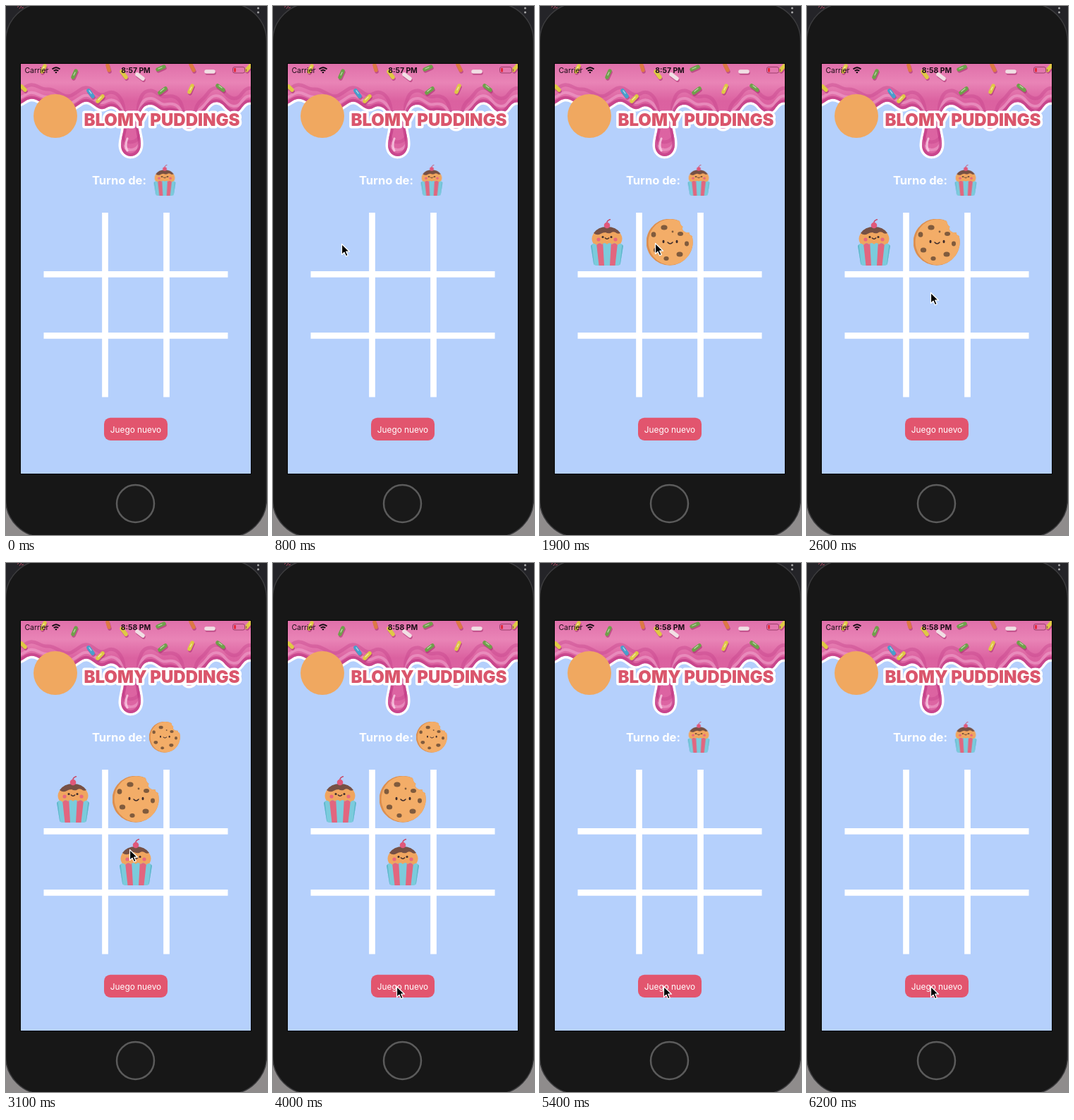
Animation, 370 px wide and 750 px high, one loop 6300 ms. Source, as an HTML page:

```html
<!DOCTYPE html>
<html lang="es">
<head>
<meta charset="utf-8">
<title>Tres en raya</title>
<style>
html, body { margin: 0; width: 100%; height: 100%; overflow: hidden; background: #242428; }
svg { display: block; }
text { font-family: Inter, Roboto, sans-serif; }

/* 6300 ms loop: 1% = 63 ms */
.early, .late, .first, .second, .third, .cup, .cookie { animation: 6300ms step-end infinite; }
.early  { animation-name: early; }
.late   { animation-name: late; }
.first  { animation-name: first; }
.second { animation-name: second; }
.third  { animation-name: third; }
.cup    { animation-name: cup; }
.cookie { animation-name: cookie; }
.button { animation: press 6300ms linear infinite; }
.cursor { animation: move 6300ms ease-in-out infinite, enter 6300ms step-end infinite; }

@keyframes early  { 0% { opacity: 1 } 31.746% { opacity: 0 } }
@keyframes late   { 0% { opacity: 0 } 31.746% { opacity: 1 } }
@keyframes first  { 0% { opacity: 0 } 14.286% { opacity: 1 } 73.016% { opacity: 0 } }
@keyframes second { 0% { opacity: 0 } 30.159% { opacity: 1 } 73.016% { opacity: 0 } }
@keyframes third  { 0% { opacity: 0 } 46.032% { opacity: 1 } 73.016% { opacity: 0 } }
@keyframes cup {
  0%, 30.159%, 73.016% { opacity: 1 }
  14.286%, 46.032% { opacity: 0 }
}
@keyframes cookie {
  0%, 30.159%, 73.016% { opacity: 0 }
  14.286%, 46.032% { opacity: 1 }
}
@keyframes press {
  0%, 69.841% { opacity: 1 }
  71.429%, 73.016% { opacity: .2 }
  77.778%, 100% { opacity: 1 }
}
@keyframes enter { 0% { opacity: 0 } 4.762% { opacity: 1 } }
@keyframes move {
  0%, 4.762% { transform: translate(372px, 430px) }
  11.111%, 17.46% { transform: translate(97px, 337px) }
  22.222%, 34.921% { transform: translate(163px, 336px) }
  39.683%, 52.381% { transform: translate(175px, 406px) }
  60.317%, 100% { transform: translate(175px, 600px) }
}
</style>
</head>
<body>
<svg width="370" height="750" viewBox="0 0 370 750">
  <defs>
    <clipPath id="screen"><path d="M21 82h326v581H21z"/></clipPath>
    <clipPath id="wrap"><path d="M10 38q4-6 8-1q4-5 8-1q3.500-4 7 0q3.500-4 7 0q4-4 8 1q4-5 8 1L52 63q-.5 3-4 3H18q-3.500 0-4-3z"/></clipPath>
    <linearGradient id="outside" x2="0" y2="1">
      <stop offset=".5" stop-color="#242428"/><stop offset=".9" stop-color="#8f8c8c"/>
    </linearGradient>
    <linearGradient id="pink" gradientUnits="userSpaceOnUse" x1="0" y1="82" x2="0" y2="214">
      <stop offset="0" stop-color="#e070aa"/><stop offset=".2" stop-color="#e984b6"/>
      <stop offset=".4" stop-color="#db61a0"/><stop offset="1" stop-color="#dd65a3"/>
    </linearGradient>

    <path id="icing" d="M14 76H354V139C343 133 338 139 333 146C327 154 318 152 311 144C303 133 292 134 285 145C278 155 274 153 270 163C268 177 252 178 250 164C247 151 239 147 230 148C218 151 215 141 206 140C194 139 191 149 188 160C185 174 192 185 191 197C190 218 164 218 163 198C163 184 170 174 166 160C162 145 152 139 143 144C133 150 128 142 119 137C109 132 102 143 92 147C80 151 72 138 60 138C48 139 44 130 34 132C27 133 24 140 14 140z"/>
    <clipPath id="glaze"><use href="#icing"/></clipPath>

    <symbol id="cupcake" viewBox="0 0 66 66">
      <path d="M33 7q-1-5 5-6.500" fill="none" stroke="#c94a68" stroke-width="1.500"/>
      <ellipse cx="33" cy="28" rx="21.500" ry="16" fill="#f0a55f"/>
      <path d="M14 20Q20 11 33 11t19 9q-4 2-7-1q-4-2-7 1q-4 1-7-1q-4 0-7 2q-5 3-10-1z" fill="#775044"/>
      <circle cx="33" cy="9" r="4.300" fill="#e0587a"/>
      <g fill="#e9677e"><circle cx="21" cy="29" r="2.600"/><circle cx="45" cy="29" r="2.600"/></g>
      <g fill="#3d2b2b"><circle cx="27" cy="25.500" r="1.500"/><circle cx="39" cy="25.500" r="1.500"/></g>
      <path d="M30 26.500q3 3.500 6 0" fill="none" stroke="#3d2b2b" stroke-width="1.300"/>
      <g clip-path="url(#wrap)">
        <path d="M8 30h50v36H8z" fill="#7bcbdc"/>
        <path d="M17.500 30h9.500l2 36h-7.500zM39 30h9.500l-4 36H37z" fill="#e2667f"/>
        <path d="M8 30h3l4 36h-5zM55 30h4l-5 36h-3z" fill="#5fb7cc"/>
      </g>
    </symbol>

    <symbol id="biscuit" viewBox="0 0 66 66">
      <path d="M47 3A33 33 0 1 0 64.500 24q-4-1-4-5q-5 1-8-2t-1-6q-4-3-4.500-8z" fill="#dc8f50"/>
      <path d="M47 3A31.500 32.500 0 1 0 64.500 24q-4-1-4-5q-5 1-8-2t-1-6q-4-3-4.500-8z" fill="#f3ad68"/>
      <g fill="#805b3d">
        <ellipse cx="25" cy="12" rx="4.600" ry="3.500"/><ellipse cx="48" cy="21" rx="4" ry="3"/>
        <ellipse cx="10" cy="22" rx="3.400" ry="3.800"/><ellipse cx="57" cy="35" rx="3" ry="3.400"/>
        <ellipse cx="14" cy="44" rx="4.200" ry="3.600"/><ellipse cx="47" cy="50" rx="4.500" ry="3.600"/>
        <ellipse cx="28" cy="56" rx="3.600" ry="3"/><circle cx="37" cy="18" r="1.400"/>
      </g>
      <g fill="#3d2b2b"><ellipse cx="24" cy="32" rx="1.500" ry="2.200"/><ellipse cx="43" cy="32" rx="1.500" ry="2.200"/></g>
      <path d="M30 33q3.500 4 7 0" fill="none" stroke="#3d2b2b" stroke-width="1.500" stroke-linecap="round"/>
    </symbol>
  </defs>

  <!-- Phone -->
  <path d="M0 0h370v750H0z" fill="url(#outside)"/>
  <path d="M16 2l2-2m1 4l3-4m0 3l3-1" stroke="#b04860"/>
  <rect x="-.5" y="-4" width="370" height="757" rx="54" fill="#171717" stroke="#3c3c3e" stroke-width="1.500"/>
  <g fill="#aaa"><circle cx="357.500" cy="3" r="1.500"/><circle cx="357.500" cy="9" r="1.500"/></g>
  <circle cx="183.500" cy="705.500" r="26.500" fill="#191919" stroke="#5b5b5b" stroke-width="2.500"/>
  <path d="M20 81h328v583H20z" fill="#050505"/>

  <g clip-path="url(#screen)">
    <path d="M21 82h326v581H21z" fill="#b5d0fc"/>

    <!-- Icing -->
    <use href="#icing" fill="url(#pink)" stroke="#fff" stroke-width="7" stroke-linejoin="round" paint-order="stroke"/>
    <g fill="none" stroke-linecap="round">
      <g clip-path="url(#glaze)">
        <use href="#icing" y="-20" stroke="#c44389" stroke-width="5" opacity=".4"/>
        <use href="#icing" y="-9" stroke="#f0a2cb" stroke-width="4" opacity=".6"/>
        <use href="#icing" stroke="#bd3580" stroke-width="8" opacity=".6"/>
      </g>
      <path d="M172 188q-4 10 0 17M256 156q4 6 3 11" stroke="#fbd0e6" stroke-width="3" opacity=".8"/>
      <g stroke-width="5.500">
        <path transform="translate(1 2)" d="M51 93l4-8M95 101l4-9M144 84l2 7M164 93l6 8M186 97l8 6M215 90l9-4M262 83l4 8M284 93h10M260 122l4-9M218 123l8-6M300 113l8 6M117 120l6 8M130 135l7-7M341 91l5-6M22 114l5 5" stroke="#a92f70" opacity=".6"/>
        <path d="M51 93l4-8M164 93l6 8M260 122l4-9M130 135l7-7M341 91l5-6M22 114l5 5" stroke="#dfc944"/>
        <path d="M95 101l4-9M215 90l9-4M218 123l8-6M300 113l8 6" stroke="#6fa04a"/>
        <path d="M186 97l8 6M284 93h10" stroke="#f1dfe4"/>
        <path d="M144 84l2 7M262 83l4 8" stroke="#dd7a45"/>
        <path d="M117 120l6 8" stroke="#479fcc"/>
        <path d="M52 90l2-4M96 98l2-4M216 89l5-2M219 121l5-4M261 119l2-4M302 113l4 3M118 120l3 4M131 133l4-4" stroke="#fff" stroke-width="1.300" opacity=".55"/>
      </g>
    </g>

    <!-- Title -->
    <circle cx="70" cy="156" r="31" fill="#f0a860"/>
    <text x="221" y="169.500" font-size="24" font-weight="900" text-anchor="middle" fill="#da566c"
      stroke="#fff" stroke-width="7" stroke-linejoin="round" paint-order="stroke">BLOMY PUDDINGS</text>

    <!-- Status bar -->
    <g font-size="10.400" fill="#1c0d16">
      <text x="26.500" y="94.500">Carrier</text>
      <g font-weight="700" text-anchor="middle">
        <text class="early" x="184" y="94.500">8:57 PM</text>
        <text class="late" x="184" y="94.500">8:58 PM</text>
      </g>
    </g>
    <g fill="none" stroke="#120a10" stroke-width="2">
      <path d="M65.500 89.500q5.500-4.500 11 0M67.800 92q3.200-2.600 6.400 0"/>
      <path d="M70.900 93.200v2" stroke-width="2.400"/>
    </g>
    <rect x="321.500" y="86.500" width="17" height="8.500" rx="2.500" fill="none" stroke="#9c3f6c"/>
    <path d="M340.500 89.500v3" stroke="#9c3f6c" stroke-width="1.400"/>
    <path d="M323 88h3v5.500h-3z" fill="#e32b3f"/>

    <!-- Turn -->
    <text x="122" y="253" font-size="16.500" font-weight="700" fill="#fff">Turno de:</text>
    <use class="cup" href="#cupcake" x="203" y="225" width="44" height="44"/>
    <use class="cookie" href="#biscuit" x="203" y="225" width="44" height="44"/>

    <!-- Board -->
    <path d="M140.500 293v261.500M227.500 293v261.500M53.500 380.300h261M53.500 467.300h261" stroke="#fff" stroke-width="8.700"/>
    <use class="first" href="#cupcake" x="62" y="302" width="66" height="66"/>
    <use class="second" href="#biscuit" x="151" y="302" width="66" height="66"/>
    <use class="third" href="#cupcake" x="151" y="391" width="66" height="66"/>

    <g class="button">
      <rect x="139" y="583.700" width="90" height="32.300" rx="9" fill="#e2556e"/>
      <text x="184" y="604.500" font-size="11.800" text-anchor="middle" fill="#fff">Juego nuevo</text>
    </g>
  </g>

  <path class="cursor" d="M.5 .5v15l3.500-3.300l2.500 5.600l2.700-1.200l-2.500-5.400h4.800z" fill="#000" stroke="#fff" stroke-width="1.200" stroke-linejoin="round"/>
</svg>
</body>
</html>
```
